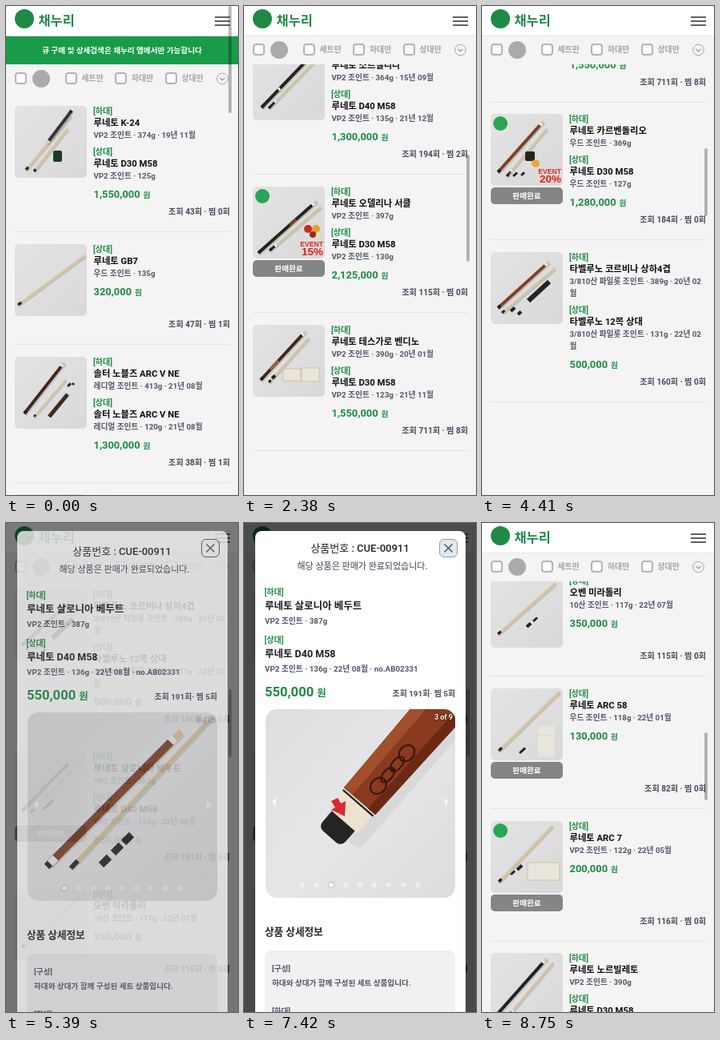
Recreate the animation shown at these times as an HTML page. Size 290 px wide and 612 px high, loop 9.31 s.

```html
<!DOCTYPE html>
<html lang="ko">
<head>
<meta charset="utf-8">
<title>중고 큐 목록</title>
<style>
html, body { margin: 0; width: 100%; height: 100%; overflow: hidden; }
#stage { position: relative; width: 290px; height: 612px; overflow: hidden; background: #f4f4f4;
  font-family: Roboto, "Noto Sans CJK KR", "Noto Sans CJK JP", "Noto Sans CJK", sans-serif; color: #3d4252; }
#stage div, #stage svg { position: absolute; }
.t { white-space: pre; line-height: 16px; }
.tag { font-size: 10px; font-weight: 700; color: #1f8a45; }
.name { font-size: 11.3px; font-weight: 700; color: #0c0c0c; }
.sub { font-size: 9.7px; font-weight: 700; color: #50556a; }
.price { font-size: 12.9px; font-weight: 700; color: #1f8a45; }
.price span { font-size: .75em; margin-left: 4px; }
.meta { font-size: 10.1px; font-weight: 700; color: #464b5c; }
.item { left: 0; width: 290px; }
.sep { left: 11px; width: 269px; height: 1px; background: #e2e2e2; }
.photo { left: 11px; top: 0; border-radius: 5px; }
.sold { left: 11px; top: 92px; width: 90px; height: 21px; border-radius: 5px; background: #858585; }
.white { color: #fff; font-weight: 700; }
#banner { width: 290px; height: 36px; background: #199c49; }
#filter { width: 290px; height: 36px; background: #f4f4f4; }
#head { width: 290px; height: 37px; background: #fff; border-bottom: 1px solid #e6e6e6; }
#logo { left: 11px; top: 4px; width: 24px; height: 24px; border-radius: 50%; background: #1f8a45; }
.line { left: 261px; width: 19px; height: 2px; background: #606060; }
.box { top: 10px; width: 11px; height: 11px; border: 2px solid #b1b2bc; border-radius: 4px; background: #fff; }
.opt { font-size: 9.9px; font-weight: 900; color: #a4a4a4; }
#bar { left: 278px; width: 4px; border-radius: 2px; background: rgba(0,0,0,.27); }
#dim { inset: 0; background: rgba(0,0,0,.7); }
#card { left: 14px; top: 10px; width: 263px; height: 640px; border-radius: 8px; background: #fff; overflow: hidden; }
#body { left: -14px; top: -10px; width: 290px; height: 640px; }
#body .name { font-size: 12.5px; color: #1d1d1f; }
#body .sub { font-size: 9.8px; }
#view { left: 27px; top: 233px; width: 237px; height: 236px; border-radius: 14px; overflow: hidden; }
#strip { left: 0; top: 0; width: 711px; height: 236px; }
.dot { top: 217px; width: 6px; height: 6px; border-radius: 50%; background: #fff; }
#close { left: 230px; top: 10px; width: 21px; height: 21px; border: 1.5px solid #555; border-radius: 6px; }
#info { left: 26px; top: 535px; width: 238px; height: 110px; border-radius: 8px; background: #f1f1f2; }
</style>
</head>
<body>
<div id="stage">
  <div id="list"></div>
  <div id="banner"></div>
  <div id="filter"></div>
  <div id="head"></div>
  <div id="bar"></div>
  <div id="dim"></div>
  <div id="card"><div id="body"></div><div id="close"></div></div>
</div>
<script>
const $ = id => document.getElementById(id);
const LOOP = 9310, STEP = 70;

// --- text and drawing helpers; y is the middle of the line
const text = (cls, x, y, s, css = '') => `<div class="t ${cls}" style="left:${x}px;top:${y - 8}px;${css}">${s}</div>`;
const right = (cls, x, y, s, css = '') => `<div class="t ${cls}" style="right:${290 - x}px;top:${y - 8}px;${css}">${s}</div>`;
const center = (cls, x, y, s, css = '') =>
  `<div class="t ${cls}" style="left:${x}px;top:${y - 8}px;transform:translateX(-50%);${css}">${s}</div>`;
const won = n => `${n}<span>원</span>`;

const CREAM = '#dcc39a', BLACK = '#242323', BROWN = '#7d4128', DARK = '#40281f';
const seg = (x1, y1, x2, y2, c, w) => `<path d="M${x1} ${y1}L${x2} ${y2}" stroke="${c}" stroke-width="${w}"/>`;
const rect = (x, y, w, h, c, more = '') => `<rect x="${x}" y="${y}" width="${w}" height="${h}" fill="${c}" ${more}/>`;
const disc = (x, y, r, c) => `<circle cx="${x}" cy="${y}" r="${r}" fill="${c}"/>`;

// a stick from its thick end to its tip, with an optional coloured butt
function stick(x1, y1, x2, y2, butt, w = 3.4, part = .55) {
  const at = k => [x1 + (x2 - x1) * k, y1 + (y2 - y1) * k];
  return seg(x1 + 1, y1 + 2, x2 + 1, y2 + 2, '#0002', w) + seg(x1, y1, x2, y2, CREAM, w * .75) +
    (butt ? seg(x1, y1, ...at(part), butt, w) + seg(...at(part), ...at(part + .03), '#eee', w) : '') +
    seg(x1, y1, ...at(.05), BLACK, w);
}
const full = (x1, y1, x2, y2, c, w = 4) => stick(x1, y1, x2, y2, c, w, .92);
const bit = (x, y, n = 5, w = 3) => seg(x, y, x + n, y - n * .9, BLACK, w);
const paper = (x, y, w, h, edge = '#cdb994') => rect(x, y, w, h, '#e8e5dc', `stroke="${edge}" stroke-width=".8"`);
const badge = disc(12, 12, 9, '#2aa455');
const sale = n => `<g fill="#e3211d" font-family="Liberation Sans, Arial, sans-serif" font-weight="700" text-anchor="end">
  <text x="88" y="75" font-size="8.6">EVENT</text><text x="88" y="86" font-size="13.5">${n}%</text></g>`;
const photo = art => `<svg class="photo" width="90" height="90" fill="none">
  <defs><linearGradient id="paper" x2="1" y2="1"><stop stop-color="#e3e3e3"/><stop offset="1" stop-color="#d9d9d9"/></linearGradient></defs>
  ${rect(0, 0, 90, 90, 'url(#paper)')}${art}</svg>`;

// --- products
const D30 = '루네토 D30 M58', D40 = '루네토 D40 M58', NOBLE = '솔터 노블즈 ARC V NE';
const low = (name, ...sub) => ['[하대]', name, sub], up = (name, ...sub) => ['[상대]', name, sub];
const vp = s => 'VP2 조인트 · ' + s;
const item = (price, seen, likes, art, parts, sold) => ({ price, seen, likes, art, parts, sold });

const ITEMS = [
  item('1,550,000', 43, 0,
    stick(14, 80, 70, 12) + full(71, 6, 40, 47, '#35353c') + stick(24, 82, 66, 28) + rect(48, 56, 11, 14, '#1c3a2a', 'rx="2"'),
    [low('루네토 K-24', vp('374g · 19년 11월')), up(D30, vp('125g'))]),
  item('320,000', 47, 1, stick(4, 76, 88, 14), [up('루네토 GB7', '우드 조인트 · 135g')]),
  item('1,300,000', 38, 1,
    full(12, 71, 62, 7, DARK) + stick(24, 75, 64, 28, '', 2.6) + seg(43, 75, 66, 47, DARK, 5) + bit(66, 37, 4) + bit(72, 35, 2),
    [low(NOBLE, '레디얼 조인트 · 413g · 21년 08월'), up(NOBLE, '레디얼 조인트 · 120g · 21년 08월')]),
  item('300,000', 54, 0, stick(13, 76, 81, 9) + bit(29, 75, 4) + bit(35, 68, 5),
    [up(D30, vp('121g · 20년 03월'))]),
  item('2,100,000', 159, 2,
    full(11, 73, 78, 13, BLACK) + seg(26, 59, 48, 40, '#9d5a38', 4) + stick(24, 72, 82, 20, BLACK, 3, .15),
    [low('루네토 페르다 노온', vp('395g · 20년 07월')), up(D30, vp('135g · 22년 01월'))]),
  item('1,300,000', 194, 2,
    full(11, 74, 77, 5, BLACK) + seg(32, 52, 34, 50, '#eee', 4) + stick(20, 75, 80, 13, BLACK, 3, .12),
    [low('루네토 소르벨리나', vp('364g · 15년 09월')), up(D40, vp('135g · 21년 12월'))]),
  item('2,125,000', 115, 0,
    full(7, 83, 80, 18, BLACK) + seg(46, 48, 54, 41, BROWN, 4) + stick(21, 80, 85, 25, BLACK, 3, .1) +
    disc(69, 53, 5, '#c92d22') + disc(79, 53, 5, '#e8a126') + disc(75, 60, 4, '#a8241d') + badge + sale(15),
    [low('루네토 오델리나 서클', vp('397g')), up(D30, vp('130g'))], 1),
  item('1,550,000', 711, 8,
    full(10, 69, 66, 8, DARK) + seg(22, 56, 32, 45, '#a4663c', 3) + stick(20, 72, 70, 16, '', 3) + paper(38, 55, 22, 15) + paper(61, 54, 22, 17) + bit(24, 67, 4, 4),
    [low('루네토 테스가로 벤디노', vp('390g · 20년 01월')), up(D30, vp('123g · 21년 11월'))]),
  item('1,280,000', 184, 0,
    full(9, 73, 66, 9, BROWN) + stick(20, 78, 70, 18, BROWN, 2.8, .1) + rect(43, 47, 12, 12, BLACK, 'rx="2"') + disc(56, 62, 5, '#e8a546') +
    bit(28, 78, 5) + bit(38, 77, 4) + badge + sale(20),
    [low('루네토 카르벤돌리오', '우드 조인트 · 369g'), up(D30, '우드 조인트 · 127g')], 1),
  item('500,000', 160, 0,
    full(9, 70, 73, 12, BROWN) + stick(14, 76, 80, 20, '', 3) + seg(47, 61, 73, 37, BLACK, 6) + bit(25, 74, 5, 4) + bit(34, 78, 4, 4),
    [low('타벨루노 코르비나 상하4겹', '3/810산 파일롯 조인트 · 389g · 20년 02', '월'),
     up('타벨루노 12쪽 상대', '3/810산 파일롯 조인트 · 131g · 22년 02', '월')]),
  item('550,000', 191, 5, full(9, 74, 72, 10, BROWN) + stick(20, 76, 86, 6, '', 2.6) + bit(36, 72, 12),
    [low('루네토 살로니아 베두트', vp('387g')), up(D40, vp('136g · 22년 08월'))], 1),
  item('350,000', 115, 0, stick(9, 73, 81, 9) + bit(45, 64, 5, 4) + bit(53, 57, 5),
    [up('오벤 미라톨리', '10산 조인트 · 117g · 22년 07월')]),
  item('130,000', 82, 0,
    stick(10, 78, 86, 4) + paper(59, 46, 22, 13, '#d8d6d0') + paper(58, 59, 22, 27, '#d8d6d0') + bit(36, 81, 7),
    [up('루네토 ARC 58', '우드 조인트 · 118g · 22년 01월')], 1),
  item('200,000', 116, 0, stick(10, 76, 77, 6) + paper(46, 52, 40, 22) + bit(25, 67, 5) + bit(33, 61, 6, 4) + badge,
    [up('루네토 ARC 7', vp('122g · 22년 05월'))], 1),
  item('1,450,000', 93, 1, full(7, 78, 70, 7, BLACK) + stick(19, 82, 78, 12, BLACK, 3, .12),
    [low('루네토 노르빌레토', vp('390g')), up(D30, vp('128g'))])
];

// adds one product and returns its height
function addItem(it, top) {
  let y = 6.5, html = photo(it.art);
  for (const [tag, name, subs] of it.parts) {
    html += text('tag', 109, y, tag) + text('name', 109.5, y + 15, name);
    y += 15;
    for (const s of subs) html += text('sub', 109.5, y += 15, s);
    y += 21;
  }
  y += 2;
  html += text('price', 109.5, y, won(it.price));
  if (it.sold) html += `<div class="sold">${center('white', 45, 10.5, '판매완료', 'font-size:9.6px')}</div>`;
  const meta = Math.max(y + 22.2, it.sold ? 125.5 : 101);
  html += right('meta', 280, meta, `조회 ${it.seen}회 · 찜 ${it.likes}회`);
  html += `<div class="sep" style="top:${Math.round(meta + 24)}px"></div>`;
  const el = document.createElement('div');
  el.className = 'item';
  el.style.top = Math.round(top) + 'px';
  el.innerHTML = html;
  $('list').append(el);
  return meta + 40;
}
ITEMS.reduce((top, it) => top + addItem(it, top), 125);
const rows = [...$('list').children];

// --- fixed bars
$('banner').innerHTML = center('white', 145, 18, '큐 구매 및 상세검색은 채누리 앱에서만 가능합니다', 'font-size:9.6px');
$('head').innerHTML = '<div id="logo"></div>' +
  text('', 40.5, 18.5, '채누리', 'font-size:16.4px;font-weight:900;color:#1f8a45') +
  [13, 18, 23].map(y => `<div class="line" style="top:${y}px"></div>`).join('');
$('filter').innerHTML =
  [11, 74, 136, 199].map(x => `<div class="box" style="left:${x}px"></div>`).join('') +
  text('opt', 94.5, 18, '세트만') + text('opt', 157, 18, '하대만') + text('opt', 219.5, 18, '상대만') +
  `<svg width="290" height="36" fill="none">${disc(44, 18, 11, '#aaa')}
  <circle cx="270.5" cy="18" r="6.8" stroke="#a6a6a6"/><path d="M267.5 17l3 3 3-3" stroke="#999" stroke-width="1.2"/></svg>`;

// --- product sheet
const scene = (i, art) => `<g transform="translate(${i * 237})"><svg width="237" height="236">${rect(0, 0, 237, 236, 'url(#soft)')}${art}</svg></g>`;
const wide = full(27, 190, 192, 24, BROWN, 10) + seg(27, 190, 35, 182, '#eee', 10) + seg(24, 193, 28, 189, BLACK, 9) +
  stick(54, 195, 227, 9, '', 6) + [0, 15, 28].map(k => seg(92 + k, 191 - k, 102 + k, 181 - k, BLACK, 9)).join('');
const middle = `<g transform="translate(20 200) rotate(-42)">${rect(0, -14, 290, 28, '#81351d')}${rect(0, -14, 290, 9, '#9c4a2b')}
  ${rect(104, -14, 22, 28, '#eadfca')}${rect(126, -14, 3, 28, BLACK)}</g>` + stick(90, 225, 236, 90, '', 10);
const knot = [84, 102, 120, 138].map((x, i) =>
  `<ellipse cx="${x}" cy="5" rx="11" ry="${i % 3 ? 6 : 9}" fill="none" stroke="#3a1710" stroke-width="2.2"/>`).join('');
const close = `<g transform="translate(82 156) rotate(-49)">
  ${rect(8, -20, 320, 60, '#0000000e', 'rx="8"')}
  ${rect(-4, -18, 36, 38, '#242424', 'rx="8"')}${rect(22, -23, 32, 47, '#ece2d0', 'rx="2"')}
  ${rect(50, -25, 2.5, 50, BLACK)}${rect(52.5, -25, 2, 50, '#eee')}
  <path d="M54-26L320-30V32L54 26z" fill="#8a3a1f"/><path d="M54-26L320-30V-14L54-12z" fill="#a24f2d"/>
  <path d="M54 14L320 18V32L54 26z" fill="#6b2914"/>${knot}${disc(111, 5, 3, '#3a1710')}</g>
  <path d="M82 115l8-4 4 7 6-3-1 19-17-8 5-3z" fill="#dc2631"/>`;

$('body').innerHTML =
  center('', 145, 32, '상품번호 : CUE-00911', 'font-size:13px;font-weight:500;color:#222') +
  center('', 148, 55, '해당 상품은 판매가 완료되었습니다.', 'font-size:11px;font-weight:500') +
  text('tag', 25.5, 87, '[하대]') + text('name', 26, 104, '루네토 살로니아 베두트') + text('sub', 26, 123, vp('387g')) +
  text('tag', 25.5, 147, '[상대]') + text('name', 26, 164, D40) + text('sub', 26, 183, vp('136g · 22년 08월 · no.AB02331')) +
  text('price', 26, 212, won('550,000'), 'font-size:16.6px') +
  right('meta', 264, 214, '조회 191회· 찜 5회', 'font-size:9.9px') +
  `<div id="view"><svg id="strip" fill="none"><defs><linearGradient id="soft" x2="1" y2="1">
    <stop stop-color="#dededf"/><stop offset=".5" stop-color="#e6e6e8"/><stop offset="1" stop-color="#dcdcdf"/></linearGradient></defs>
    ${scene(0, wide)}${scene(1, middle)}${scene(2, close)}</svg>
    <svg width="237" height="236"><path d="M13 111v10l-5-5zM224 111v10l5-5z" fill="#fffc"/></svg>
    ${Array.from({ length: 9 }, (_, i) => `<div class="dot" style="left:${43 + i * 18}px"></div>`).join('')}
    <div id="count" class="t white" style="right:3px;top:2px;font-size:9px;text-shadow:0 0 2px #000"></div></div>` +
  text('', 26, 512, '상품 상세정보', 'font-size:12.6px;font-weight:700;color:#26272b') +
  `<div id="info">${text('sub', 9, 23, '[구성]', 'font-size:9.6px')}
    ${text('sub', 9, 41, '하대와 상대가 함께 구성된 세트 상품입니다.', 'font-size:9.6px')}
    ${text('sub', 9, 76, '[하대]', 'font-size:9.6px')}</div>`;
$('close').innerHTML = '<svg width="21" height="21"><path d="M5.5 5.5l10 10M15.5 5.5l-10 10" stroke="#4a4f58" stroke-width="1.4"/></svg>';
const dots = [...document.querySelectorAll('.dot')];

// --- motion
const span = (t, a, b) => Math.min(1, Math.max(0, (t - a) / (b - a)));
const swipe = (t, a, b) => { const s = span(t, a, b) ** .91; return s * s * (3 - 2 * s); };
const SCROLLS = [[1120, 2380, 872], [2520, 3080, 417], [4340, 4830, 244], [7980, 8750, 392]];
const LOADS = [[0, 8], [2660, 10], [4690, 12], [8120, 15]];

function draw(t) {
  const y = Math.round(SCROLLS.reduce((sum, [a, b, d]) => sum + d * swipe(t, a, b), 0));
  const loaded = LOADS.filter(([at]) => t >= at).pop()[1];
  $('list').style.transform = `translateY(${-y}px)`;
  rows.forEach((el, i) => el.style.display = i < loaded ? '' : 'none');
  $('banner').style.top = 38 - y + 'px';
  $('filter').style.top = Math.max(37, 73 - y) + 'px';
  const tall = t >= 2660;
  $('bar').style.top = y * (tall ? .136 : .2135) + 'px';
  $('bar').style.height = (tall ? 85 : 134) + 'px';

  const shown = 1 - (1 - span(t, 5180, 5600)) ** 2 - swipe(t, 7420, 7840);
  $('dim').style.opacity = $('card').style.opacity = shown;
  $('body').style.transform = `translateY(${(1 - shown) * 16}px)`;
  const pressed = t >= 7420;
  $('close').style.background = pressed ? '#e1eaee' : '#fff0';
  $('close').style.borderColor = pressed ? '#91a0aa' : '#555';

  const pos = swipe(t, 6020, 6510) + swipe(t, 6510, 7070), page = Math.round(pos);
  $('strip').style.transform = `translateX(${-237 * pos}px)`;
  $('count').textContent = `${page + 1} of 9`;
  dots.forEach((d, i) => {
    d.style.opacity = i === page ? 1 : .5;
    d.style.boxShadow = i === page ? '0 0 2px #0008' : 'none';
  });
}
const start = performance.now();
(function tick() {
  const t = (performance.now() - start) % LOOP;
  draw(Math.floor(t / STEP) * STEP);
  requestAnimationFrame(tick);
})();
</script>
</body>
</html>
```
